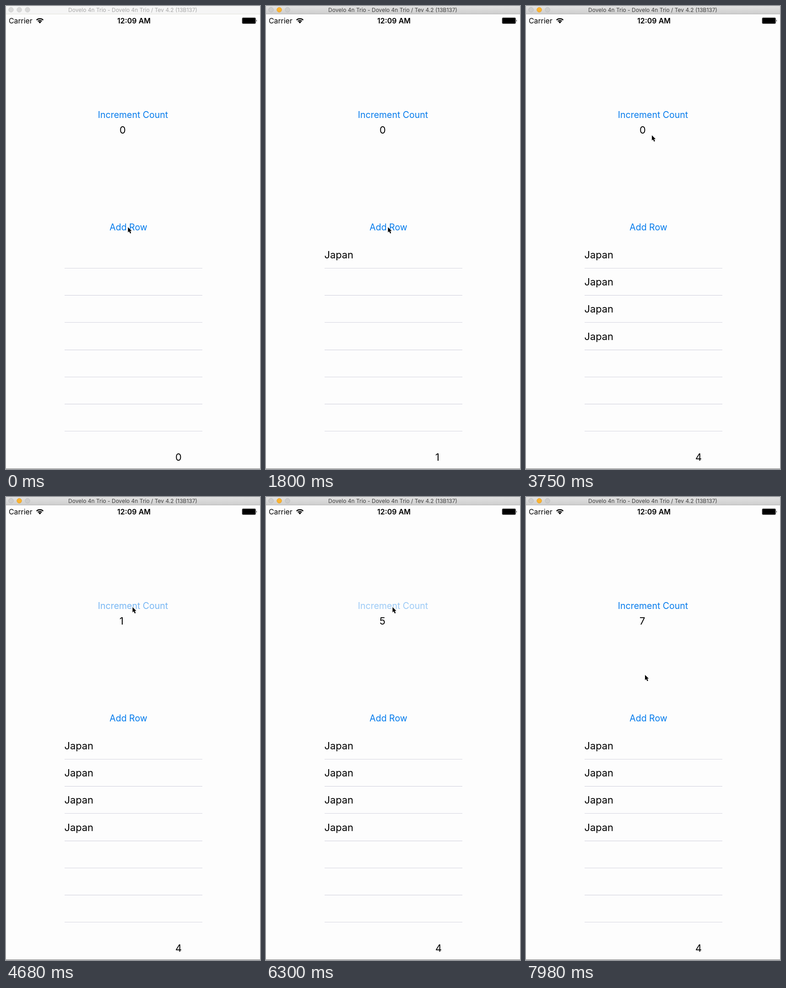
An HTML page that plays this animation: 555 px wide and 1009 px high, repeating every 8000 ms.

```html
<!DOCTYPE html>
<html lang="en">
<head>
<meta charset="utf-8">
<title>Row and count demo</title>
<style>
  html, body { margin: 0; width: 100%; height: 100%; overflow: hidden; background: #fdfdfd; }
  svg { display: block; width: 555px; height: 1009px; }
  text { font-family: Inter, Roboto, sans-serif; font-optical-sizing: none; fill: #000; white-space: pre; }
  .title { font-size: 12px; text-anchor: middle; }
  .status { font-size: 15.8px; }
  .clock { font-size: 16px; font-weight: 600; text-anchor: middle; }
  .button { font-size: 19.5px; fill: #047bec; text-anchor: middle; }
  .label { font-size: 21.8px; }
</style>
</head>
<body>
<svg viewBox="0 0 555 1009" xmlns="http://www.w3.org/2000/svg">
  <defs>
    <linearGradient id="barFill" x1="0" y1="0" x2="0" y2="1">
      <stop offset="0" stop-color="#e2e2e2"/>
      <stop offset="1" stop-color="#cecece"/>
    </linearGradient>
  </defs>
  <rect width="555" height="1009" fill="#fdfdfd"/>

  <rect id="bar" width="555" height="17"/>
  <rect id="barEdge" y="17" width="555" height="1"/>
  <g id="lights" stroke-width="1">
    <circle cx="11" cy="8.2" r="5.2"/>
    <circle cx="29" cy="8.2" r="5.2"/>
    <circle cx="47" cy="8.2" r="5.2"/>
  </g>
  <text id="title" class="title" x="277" y="12.8">Dovelo 4n Trio - Dovelo 4n Trio / Tev 4.2 (13B137)</text>

  <text class="status" x="6" y="37.7">Carrier</text>
  <g fill="none" stroke="#000" stroke-width="2.2">
    <path d="M66.7 30.6 A10.4 10.4 0 0 1 81.3 30.6"/>
    <path d="M69.6 33.5 A6.3 6.3 0 0 1 78.4 33.5"/>
  </g>
  <path d="M74 38 L71 35 A4.3 4.3 0 0 1 77 35 Z"/>
  <text class="clock" x="279.5" y="37.8">12:09 AM</text>
  <rect x="516" y="25.5" width="29.5" height="13" rx="2" fill="#000" stroke="#777" stroke-width="1"/>
  <path d="M547 29.5 Q549 32 547 34.5 Z"/>

  <text id="increment" class="button" x="277.5" y="243.7">Increment Count</text>
  <text id="count" class="label" x="248" y="277.5">0</text>
  <text id="add" class="button" x="267.5" y="488.6">Add Row</text>
  <g id="rows"></g>
  <text id="total" class="label" x="370" y="991">0</text>
  <rect y="1008" width="555" height="1" fill="#777"/>

  <path id="cursor" d="M0 0 V11.4 L2.6 9 L4.7 13.7 L6.9 12.7 L4.8 8.2 H8.2 Z"
        stroke="#fff" stroke-width="1.2" paint-order="stroke" stroke-linejoin="round"/>
</svg>
<script>
const LOOP = 8000, ACTIVATE = 420, FADE = 450, ROW_STEP = 59.2, ROW_COUNT = 7;

// [press, release] times of each click
const addClicks = [[450, 630], [1950, 2080], [2300, 2420], [2610, 2770]];
const countClicks = [[4330, 4480], [4850, 4990], [5310, 5470], [5700, 5820],
                     [6040, 6160], [6380, 6500], [6710, 6840]];
// [time, x, y] of the pointer tip
const path = [[0, 266.5, 482], [3270, 266.5, 482], [3750, 275, 282], [4020, 276.5, 240],
              [7350, 276.5, 240], [8000, 260, 388]];

const $ = id => document.getElementById(id);
const svgEl = (name, attrs, parent) => {
  const el = document.createElementNS('http://www.w3.org/2000/svg', name);
  for (const key in attrs) el.setAttribute(key, attrs[key]);
  return parent.appendChild(el);
};

const names = [];
for (let i = 0; i < ROW_COUNT; i++) {
  svgEl('rect', { x: 128, y: Math.round(571 + i * ROW_STEP), width: 301, height: 1,
                  fill: i % 2 ? '#cfcfdc' : '#d6d6e0' }, $('rows'));
  const name = svgEl('text', { class: 'label', x: 127.5, y: 550 + i * ROW_STEP }, $('rows'));
  name.textContent = 'Japan';
  names.push(name);
}

const released = (clicks, t) => clicks.filter(c => t >= c[1]).length;

function buttonAlpha(clicks, t) {
  const last = clicks.filter(c => t >= c[0]).pop();
  if (!last) return 1;
  if (t < last[1]) return 0.2;
  const p = Math.min(1, (t - last[1]) / FADE);
  return 0.2 + 0.8 * p * p * (3 - 2 * p);
}

function pointer(t) {
  const i = path.findIndex((p, k) => k > 0 && t <= p[0]);
  const [t0, x0, y0] = path[i - 1], [t1, x1, y1] = path[i];
  let p = (t - t0) / (t1 - t0);
  p = i === 3 ? 1 - (1 - p) ** 2 : p * p * (3 - 2 * p);
  return [x0 + (x1 - x0) * p, y0 + (y1 - y0) * p];
}

function drawWindow(active) {
  $('bar').setAttribute('fill', active ? 'url(#barFill)' : '#f5f5f5');
  $('barEdge').setAttribute('fill', active ? '#b4b4b4' : '#e2e2dc');
  $('title').style.fill = active ? '#404040' : '#a8a8a8';
  [...$('lights').children].forEach((dot, i) => {
    const lit = active && i === 1;
    dot.setAttribute('fill', lit ? '#fdb42e' : active ? '#cdcdcd' : '#d9d9d9');
    dot.setAttribute('stroke', lit ? '#e0a033' : active ? '#bdbdbd' : '#cfcfcf');
  });
}

function draw(t) {
  const rows = released(addClicks, t);
  drawWindow(t >= ACTIVATE);
  names.forEach((name, i) => name.setAttribute('visibility', i < rows ? 'visible' : 'hidden'));
  $('total').textContent = rows;
  $('count').textContent = released(countClicks, t);
  $('add').setAttribute('opacity', buttonAlpha(addClicks, t));
  $('increment').setAttribute('opacity', buttonAlpha(countClicks, t));
  $('cursor').setAttribute('transform', `translate(${pointer(t)})`);
}

const start = performance.now();
function tick() {
  draw((performance.now() - start) % LOOP);
  requestAnimationFrame(tick);
}
tick();
</script>
</body>
</html>
```
